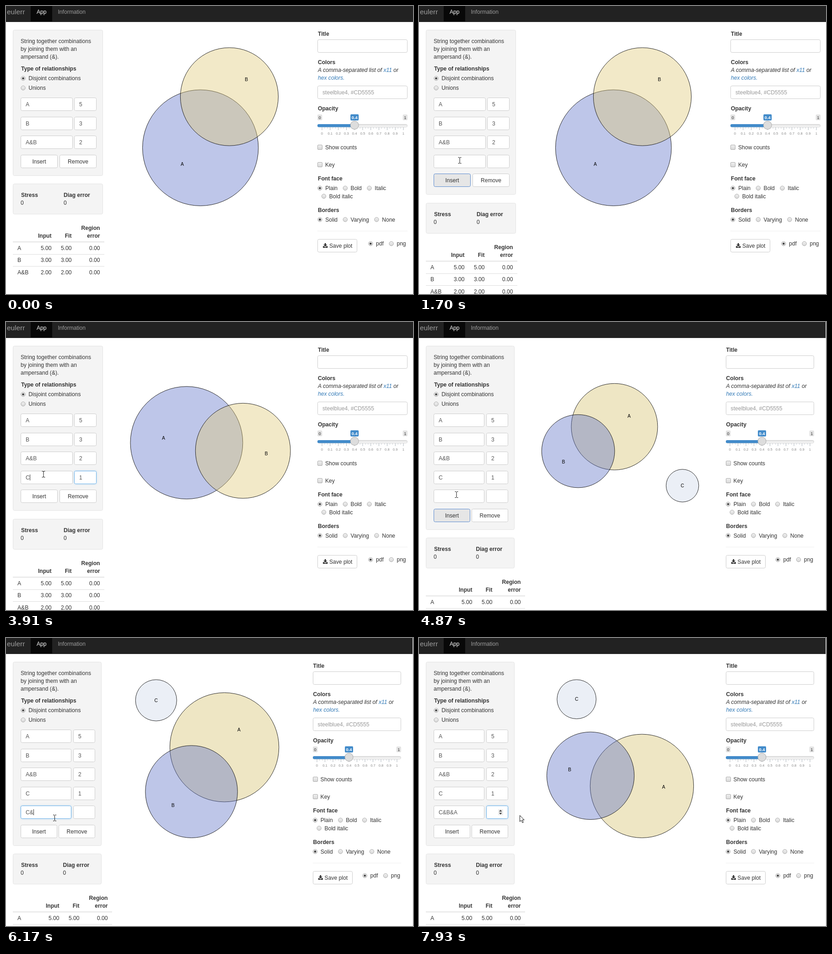
Recreate the animation shown at these times as an HTML page. Size 890 by 629 pixels, loop 7.99 s.

```html
<!DOCTYPE html>
<html lang="en">
<head>
<meta charset="utf-8">
<title>eulerr</title>
<style>
html, body { margin: 0; width: 100%; height: 100%; overflow: hidden; background: #fff; }
svg { display: block; font: 12.1px "Liberation Sans", Arial, sans-serif; fill: #333; }
.b { font-weight: bold; }
.i { font-style: italic; }
.r { text-anchor: end; }
.m { text-anchor: middle; }
.link { fill: #337ab7; }
.input { fill: #555; }
.hint { fill: #999; }
.tick { font-size: 7.7px; fill: #888; text-anchor: middle; }
.tag { font-size: 9.4px; text-anchor: middle; }
.nav { fill: #9d9d9d; }
.plot { font-size: 10.3px; fill: #000; text-anchor: middle; }
.box { fill: #fff; stroke: #ccc; }
.well { fill: #f4f4f4; stroke: #e3e3e3; }
.focus { stroke: #66afe9; filter: drop-shadow(0 0 2px rgba(102,175,233,.35)); }
.hover { fill: #e6e6e6; stroke: #adadad; }
.down { fill: #e6e6e6; stroke: #5b8bd0; }
.knob { fill: url(#grey); stroke: #a4a4a4; stroke-width: .9; }
</style>
</head>
<body>
<svg id="stage" width="890" height="629" viewBox="0 0 890 629"></svg>
<script>
const LOOP = 7990;
const PAIR = ['92,112,200', '222,200,118'];
const TRIO = ['212,192,107', '94,112,197', '206,214,233'];
const TOTALS = [7, 5, 1]; // set sizes, intersections included
const GAP = 2.68;         // distance between A and B where circles have area pi * total

// degrees: direction from A to B, turn of label A and of label B; then direction and distance of C
const layouts = [
  { at: 0, dir: -60.5, turn: [19, 15] },
  { at: 1750, dir: 111.4, turn: [-15, 0] },
  { at: 3300, dir: 8.1, turn: [4, -1] },
  { at: 4200, dir: 146.1, turn: [-2, -2], c: [40.9, 5.51] },
  { at: 6170, dir: 126.6, turn: [3, 17], c: [214.5, 4.02] },
  { at: 7250, dir: 191.3, turn: [-9, 5], c: [233, 5.55] }
];
const focuses = [
  { at: 0, on: '' }, { at: 950, on: 'insert' }, { at: 1950, on: 'text3' }, { at: 2660, on: 'num3' },
  { at: 4350, on: 'insert' }, { at: 5000, on: 'text4' }, { at: 6960, on: 'num4' }
];
// pointer moves: start, end, place reached
const entry = [792, 616];
const moves = [
  [80, 740, 75, 340], [960, 1180, 93.5, 307], [1340, 1850, 88, 345], [2050, 2520, 170.5, 346.5],
  [2960, 3600, 82, 332.5], [3920, 4300, 82, 377], [5140, 5590, 106.5, 393], [6540, 6690, 176, 394],
  [6980, 7560, 220.5, 387.5]
];
const keyTimes = [5250, 5500, 6200, 6390, 6590];

const ruler = document.createElement('canvas').getContext('2d');
ruler.font = '12.1px "Liberation Sans", Arial, sans-serif';
const width = s => ruler.measureText(s).width;
const latest = (list, t) => list.filter(e => t >= e.at).pop();
const polar = (deg, r) => [r * Math.cos(deg * Math.PI / 180), r * Math.sin(deg * Math.PI / 180)];
const inside = (p, x, y, w, h) => p && p[0] >= x && p[0] < x + w && p[1] >= y && p[1] < y + h;

const text = (x, y, s, c = '') => `<text x="${x}" y="${y}" class="${c}">${s.replace(/&/g, '&amp;')}</text>`;
const rect = (x, y, w, h, c, r = 3) =>
  `<rect x="${x + .5}" y="${y + .5}" width="${w - 1}" height="${h - 1}" rx="${r}" class="${c}"/>`;
const fill = (x, y, w, h, color, r = 0) =>
  `<rect x="${x}" y="${y}" width="${w}" height="${h}" rx="${r}" fill="${color}"/>`;
const shape = (d, f, s) => `<path d="${d}" fill="${f}" stroke="${s}"/>`;
const radio = (x, y, label, on) =>
  `<circle cx="${x}" cy="${y}" r="4.7" class="knob"/>` +
  (on ? `<circle cx="${x}" cy="${y}" r="2.3" fill="#444"/>` : '') + text(x + 11.8, y + 4.3, label);

// radio buttons side by side, the first one chosen
function radios(x, y, labels) {
  return labels.map((label, i) => {
    const s = radio(x, y, label, i == 0);
    x += width(label) + 28.5;
    return s;
  }).join('');
}

function pointer(t) {
  if (t < moves[0][0]) return null;
  let [x, y] = entry;
  for (const [from, to, x1, y1] of moves) {
    const u = Math.min(1, Math.max(0, (t - from) / (to - from))), e = u * u * (3 - 2 * u);
    x += (x1 - x) * e;
    y += (y1 - y) * e;
  }
  return [x, y];
}

function navbar(narrow) {
  return fill(0, 0, 890, 34.6, '#222') + fill(0, 33.8, 890, .8, '#080808') + fill(54, 0, 47, 34, '#080808') +
    `<text x="2" y="18" class="nav" font-size="15.4">eulerr</text>` +
    `<text x="67" y="17" fill="#fff">App</text>` + text(113.5, 17, 'Information', 'nav') +
    (narrow ? fill(889, 0, 1, 629, '#eee') : '');
}

function form(t, n, narrow, focus, p) {
  const textW = narrow ? 111 : 114, numX = narrow ? 147 : 149, numW = narrow ? 48 : 49;
  const btnW = narrow ? 80 : 81, btnY = Math.round(200 + 41.5 * n);
  const rows = [['A', '5'], ['B', '3'], ['A&B', '2'], [t < 2250 ? '' : 'C', t < 3150 ? '' : '1'],
    ['C&B&A'.slice(0, keyTimes.filter(k => t >= k).length), '']].slice(0, n);
  const caret = (x, y) => fill(x, y + 8, 1, 13, '#333');
  let kind = 'arrow';
  let s = rect(15, 52, narrow ? 194 : 197, btnY - 6, 'well') +
    text(32, 81, 'String together combinations') + text(32, 98, 'by joining them with an') +
    text(32, 115, 'ampersand (&).') + text(33, 141, 'Type of relationships', 'b') +
    radio(37.5, 158, 'Disjoint combinations', true) + radio(37.5, 179, 'Unions');

  rows.forEach(([name, value], i) => {
    const y = Math.round(200 + 41.5 * i);
    const inText = focus == 'text' + i, inNum = focus == 'num' + i;
    const overNum = inside(p, numX, y, numW, 29);
    if (overNum || inside(p, 32, y, textW, 29)) kind = 'beam';
    s += rect(32, y, textW, 29, 'box ' + (inText ? 'focus' : '')) +
      rect(numX, y, numW, 29, 'box ' + (inNum ? 'focus' : '')) +
      text(43, y + 19, name, 'input') + text(numX + 11, y + 19, value, 'input');
    if (inText || (i == 3 && name && t < 4000)) s += caret(Math.round(43 + width(name)), y);
    if (inNum && !value && t < 7930) s += caret(numX + 11, y);
    if (overNum || (i == 4 && t >= 6900)) {
      const x = numX + 31;
      s += fill(x - 5, y + 8, 11, 13, '#eee') +
        `<path d="M${x - 3} ${y + 13}l3.3 -3.7 3.3 3.7zm0 2.8h6.6l-3.3 3.7z" fill="#444"/>`;
    }
  });

  const button = (x, label, held) => {
    const over = inside(p, x, btnY, btnW, 29);
    if (over) kind = 'hand';
    return rect(x, btnY, btnW, 29, 'box ' + (held ? 'down' : over ? 'hover' : '')) +
      text(x + btnW / 2, btnY + 18.5, label, 'm');
  };
  s += button(32, 'Insert', focus == 'insert') + button(narrow ? 115 : 117, 'Remove');
  return [s, kind];
}

function results(n, narrow) {
  const d = Math.round(41.5 * (n - 3)), dx = narrow ? 17 : 0, diagX = narrow ? 124.5 : 126;
  const [input, fit, error] = [99.5, 143.5, 205.5].map(x => x + dx);
  const rows = narrow ? [['A', '5.00'], ['B', '3.00']] : [['A', '5.00'], ['B', '3.00'], ['A&B', '2.00']];
  let s = rect(15, 388 + d, narrow ? 194 : 197, 67, 'well') +
    text(33, 417 + d, 'Stress', 'b') + text(32, 434 + d, '0') +
    text(diagX, 417 + d, 'Diag error', 'b') + text(diagX, 434 + d, '0') +
    text(error, 489 + d, 'Region', 'b r') + text(error, 506 + d, 'error', 'b r') +
    text(input, 506 + d, 'Input', 'b r') + text(fit, 506 + d, 'Fit', 'b r') +
    fill(15, 514.5 + d, 200 + dx, 1.6, '#ddd');
  rows.forEach(([name, value], i) => {
    const y = 533 + d + Math.round(26.3 * i);
    s += text(25, y, name) + text(input, y, value, 'r') + text(fit, y, value, 'r') + text(error, y, '0.00', 'r');
    if (i < 2) s += fill(15, y + 9, 200 + dx, 1, '#ddd');
  });
  return s;
}

// lays the circles out at unit scale, then fits and centres them in the plot area
function diagram(t, narrow) {
  const { dir, turn, c } = latest(layouts, t);
  const centres = [[0, 0], polar(dir, GAP)];
  const labels = [polar(dir + 180 + turn[0], 1.11), polar(dir + turn[1], 1.11), [0, 0]];
  if (c) centres.push(polar(...c));
  const radii = TOTALS.map(Math.sqrt);
  const [bx, by] = [0, 1].map(axis => [
    Math.min(...centres.map((p, i) => p[axis] - radii[i])),
    Math.max(...centres.map((p, i) => p[axis] + radii[i]))
  ]);
  const k = Math.min((c ? 343.5 : 350) / (bx[1] - bx[0]), 345.4 / (by[1] - by[0]));
  const px = x => (c ? 440 : 447) + k * (x - (bx[0] + bx[1]) / 2);
  const py = y => 263.7 + k * (y - (by[0] + by[1]) / 2);
  const fills = c ? TRIO : PAIR;
  return centres.map(([x, y], i) =>
    `<circle cx="${px(x)}" cy="${py(y)}" r="${k * radii[i]}" fill="rgba(${fills[i]},.4)" stroke="#111" stroke-width=".9"/>`).join('') +
    centres.map(([x, y], i) => text(px(x + labels[i][0]), py(y + labels[i][1]) + 3.7, 'ABC'[i], 'plot')).join('');
}

function options(narrow) {
  const x = narrow ? 671 : 681, w = narrow ? 193 : 197, o = narrow ? -10.4 : 0;
  const zero = narrow ? 680 : 691, step = narrow ? 17.5 : 17.8, knob = zero + 4 * step;
  const left = 682 + o, dot = 686.4 + o;
  const check = (y, label) => rect(x, y - 6, 11, 11, 'knob', 1.5) + text(698 + o, y + 4, label);
  const tag = (mid, label) => fill(mid - 5.2, 237, 10.4, 12.5, '#e3e3e3', 2) + text(mid, 246.5, label, 'tag');
  let s = text(left, 64.5, 'Title', 'b') + rect(x, 73, w, 29, 'box') +
    text(left, 127, 'Colors', 'b') +
    `<text x="${left}" y="144" class="i">A comma-separated list of <tspan class="link">x11</tspan> or</text>` +
    text(left, 161, 'hex colors.', 'i link') +
    rect(x, 174, w, 29, 'box') + text(692 + o, 192.5, 'steelblue4, #CD5555', 'hint') +
    text(left, 228, 'Opacity', 'b') + tag(x + 5.2, '0') + tag(x + w - 5.2, '1') +
    fill(knob - 9, 236.5, 18, 13.5, '#428bca', 2) +
    `<text x="${knob}" y="246.8" class="tag b" style="fill:#fff">0.4</text>` +
    `<rect x="${x + .5}" y="258.5" width="${w - 1}" height="6" rx="3" fill="url(#track)" stroke="#ccc" stroke-width=".8"/>` +
    fill(x, 258, knob - x, 6.5, '#428bca', 3);
  for (let i = 0; i <= 30; i++) {
    const at = zero + i * step / 3;
    s += fill(at - .4, 265, .8, i % 3 ? 3 : 6, i % 3 ? '#b8c0c8' : '#99a4ac');
    if (i % 3 == 0) s += text(at, 281.3, String(i / 30), 'tick');
  }
  return s + `<circle cx="${knob}" cy="260.3" r="9" fill="#ddd" stroke="#aaa"/>` +
    check(309, 'Show counts') + check(347, 'Key') +
    text(left, 381, 'Font face', 'b') + radios(dot, 397.8, ['Plain', 'Bold', 'Italic']) +
    radio(dot + 8.6, 415.5, 'Bold italic') +
    text(left, 449.5, 'Borders', 'b') + radios(dot, 466.4, ['Solid', 'Varying', 'None']) +
    fill(x, 491, w, 1, '#eee') + rect(x, 509, 87, 29, 'box') + text(707 + o, 528, 'Save plot') +
    `<path transform="translate(${693 + o} 518)" d="M3.7 0h3v3.3h2.6L5.2 7.4 1.1 3.3h2.6zM0 6.4h2.6l2.6 2.5 2.6-2.5h2.6V10H0z"/>` +
    radios(narrow ? 784.7 : 797.3, 519, ['pdf', 'png']);
}

function cursor(p, kind) {
  const art = {
    arrow: shape('M0 0V13.5L3.2 10.6 5.6 16 7.8 15 5.4 9.8H9.6Z', '#fff', '#111'),
    beam: shape('M-3.5 -6.5H-1L0 -5.5 1 -6.5H3.5M0 -5.5V5.5M-3.5 6.5H-1L0 5.5 1 6.5H3.5', 'none', '#111'),
    hand: shape('M-1.5 1Q0 -1 1.5 1V6Q3 5 4 6.5 5.5 5.7 6.5 7 8.5 6.5 9 8.5V12L7.5 16H-1.5L-5 10Q-5 8 -3 9L-1.5 10.5Z', '#fff', '#111')
  };
  return `<g transform="translate(${p[0].toFixed(1)} ${p[1].toFixed(1)})">${art[kind]}</g>`;
}

const defs = `<defs>
  <linearGradient id="grey" x2="0" y2="1"><stop stop-color="#f0f0f0"/><stop offset="1" stop-color="#d8d8d8"/></linearGradient>
  <linearGradient id="track" x2="0" y2="1"><stop stop-color="#ddd"/><stop offset="1" stop-color="#fff"/></linearGradient>
</defs>`;
const stage = document.getElementById('stage');
let shown = '';

function draw(now) {
  const t = now % LOOP;
  const n = t < 1340 ? 3 : t < 4490 ? 4 : 5;
  const narrow = t >= 4000;
  const p = pointer(t);
  const [fields, kind] = form(t, n, narrow, latest(focuses, t).on, p);
  const scene = defs + navbar(narrow) + fields + results(n, narrow) + diagram(t) + options(narrow) +
    (p ? cursor(p, kind) : '');
  if (scene != shown) stage.innerHTML = shown = scene;
}

const start = performance.now();
function tick() {
  draw(performance.now() - start);
  requestAnimationFrame(tick);
}
tick();
</script>
</body>
</html>
```
